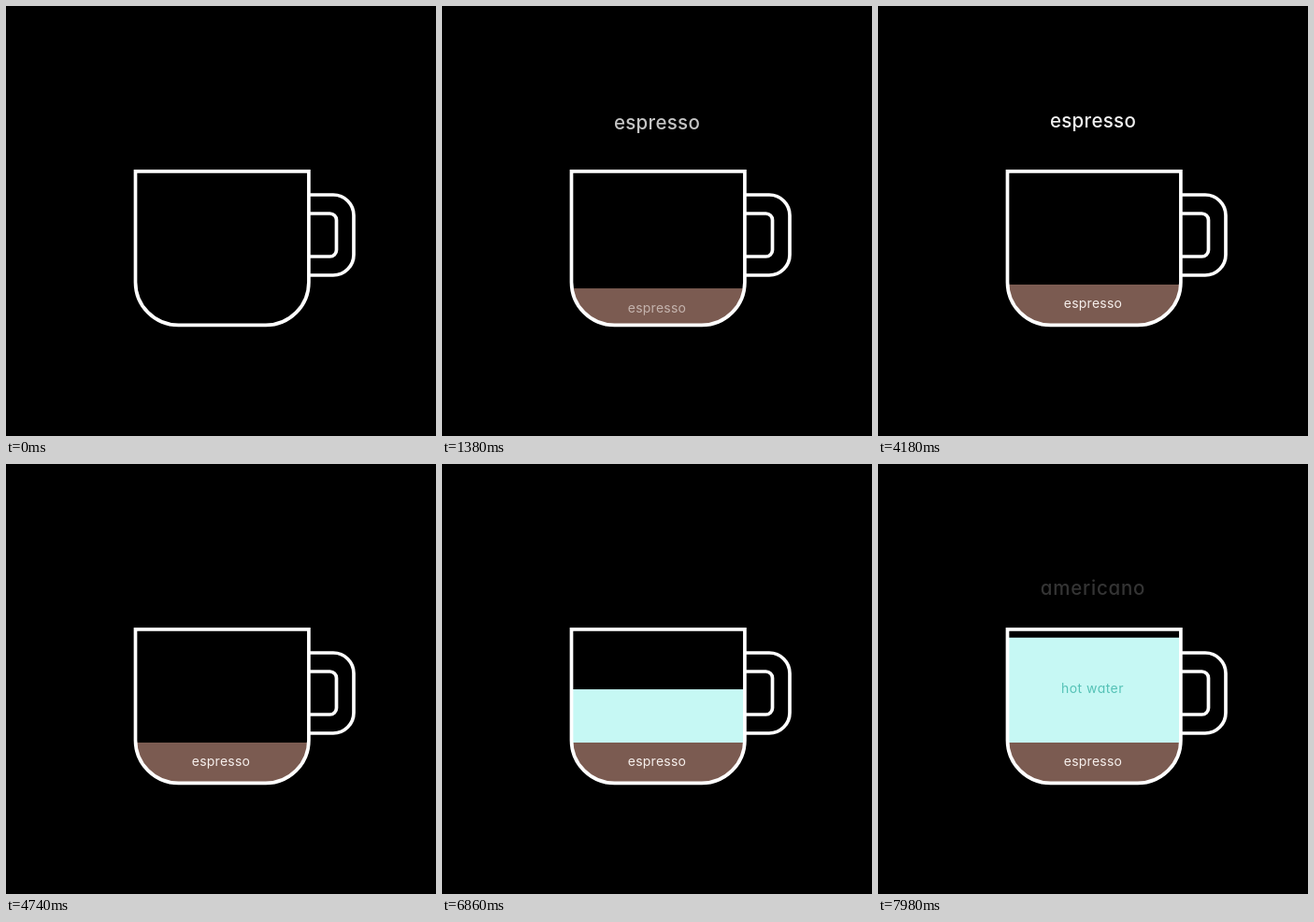
These frames come from a looping animation (460x460 px, 8000 ms). An HTML page:

```html
<!DOCTYPE html>
<html lang="en">
<head>
<meta charset="utf-8">
<title>Coffee cup</title>
<style>
  html, body { margin: 0; width: 100%; height: 100%; overflow: hidden; background: #000; }
  svg { display: block; width: 100%; height: 100%; }
  text { font-family: Inter, "Open Sans", sans-serif; font-feature-settings: "cv11"; text-anchor: middle; }
  .title { font-size: 20.5px; font-weight: 500; letter-spacing: .3px; fill: #f2f2f2; }
  .label { font-size: 14px; letter-spacing: .25px; fill: #f6efec; }
  .line { fill: none; stroke: #fff; stroke-width: 3.7; }
</style>
</head>
<body>
<svg viewBox="0 0 460 460">
  <defs>
    <path id="cup" d="M138.5 176.8H323.9V295.4A46 46 0 0 1 277.9 341.4H184.5A46 46 0 0 1 138.5 295.4Z"/>
    <clipPath id="inside"><use href="#cup"/></clipPath>
  </defs>
  <g clip-path="url(#inside)">
    <rect id="coffee" x="138" width="187" fill="#7b5b51"/>
    <rect id="water" x="138" width="187" fill="#c6f8f4"/>
  </g>
  <use href="#cup" class="line"/>
  <path class="line" d="M323.9 202H350A22 22 0 0 1 372 224V266A22 22 0 0 1 350 288H323.9M323.9 222H346.5A7 7 0 0 1 353.5 229V261A7 7 0 0 1 346.5 268H323.9"/>
  <text id="espresso" class="title" x="230">espresso</text>
  <text id="americano" class="title" x="230" style="letter-spacing:.8px">americano</text>
  <text id="coffeeLabel" class="label" x="230">espresso</text>
  <text id="waterLabel" class="label" x="229.5" style="fill:#55c2b6;letter-spacing:.45px">hot water</text>
</svg>
<script>
const LOOP = 8000, TEXT_TIME = 590, COFFEE_TOP = 298;
const el = id => document.getElementById(id);
const progress = (t, start, end) => Math.min(1, Math.max(0, (t - start) / (end - start)));
const ease = p => (1 - Math.cos(Math.PI * p)) / 2;

function setFill(id, top, bottom) {
  el(id).setAttribute("y", top);
  el(id).setAttribute("height", bottom - top);
}

// Text fades in while rising to its baseline.
function reveal(id, t, start, baseline, visible = 1) {
  const p = ease(progress(t, start, start + TEXT_TIME));
  el(id).setAttribute("y", baseline + 12.5 * (1 - p));
  el(id).setAttribute("opacity", p * visible);
}

function draw(now) {
  const t = now % LOOP;
  const coffee = ease(progress(t, 180, 1680));
  setFill("coffee", 341 - (341 - COFFEE_TOP) * coffee, 341);

  // Water pours in fast and slows down steadily.
  const pour = Math.max(0, t - 6050);
  setFill("water", COFFEE_TOP - 0.079 * pour + 1.08e-5 * pour * pour, COFFEE_TOP);

  reveal("espresso", t, 960, 130, 1 - progress(t, 4280, 4740));
  reveal("coffeeLabel", t, 1050, 323);
  reveal("waterLabel", t, 7050, 244.5);
  reveal("americano", t, 7800, 130);
}

const begin = performance.now();
function frame() {
  draw(performance.now() - begin);
  requestAnimationFrame(frame);
}
frame();
</script>
</body>
</html>
```
